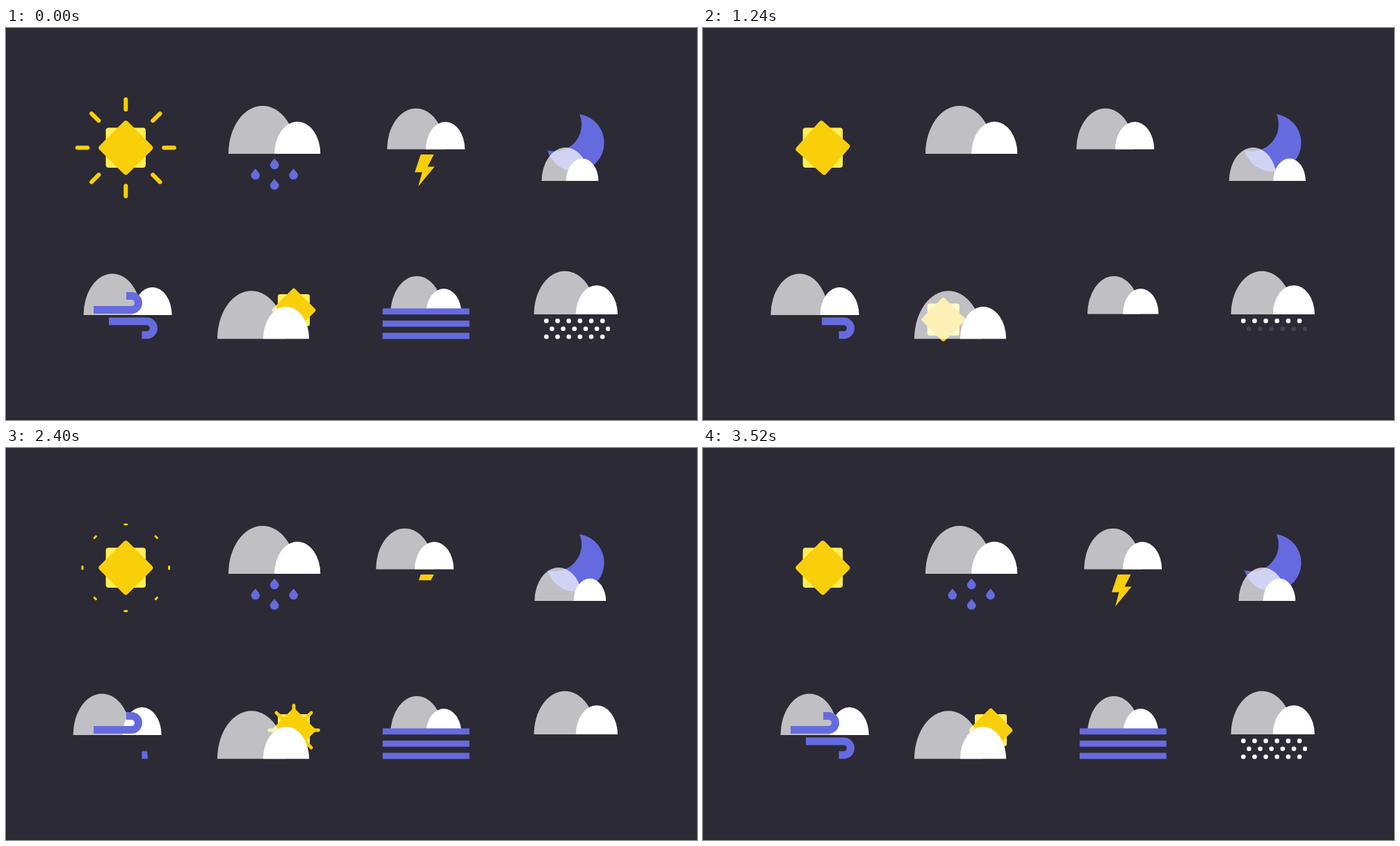
An HTML page for the animation above (3640 ms loop, 994 by 564 pixels).

```html
<!DOCTYPE html>
<html lang="en">
<head>
<meta charset="utf-8">
<title>Weather icons</title>
<style>
  html, body { margin: 0; width: 100%; height: 100%; overflow: hidden; background: #2c2a35; }
  svg { display: block; width: 994px; height: 564px; }
  .haze { fill: #fff; fill-opacity: .7; }
  .white { fill: #fff; }
  .gold { fill: #f9cf0a; }
  .lemon { fill: #ffee55; }
  .blue { fill: #656bdf; }
  .wind { fill: none; stroke: #656bdf; stroke-width: 11; }
</style>
</head>
<body>
<svg id="stage" viewBox="0 0 994 564">
  <defs>
    <clipPath id="boltClip"><rect id="wipe" x="580" y="182" width="45" height="46"/></clipPath>
    <clipPath id="snowClip"><rect x="760" y="414" width="108.7" height="40"/></clipPath>
  </defs>
  <rect y="561" width="994" height="3" fill="#2b2632"/>
</svg>
<script>
const LOOP = 3640, STEP = 40, LAST = 3520;
const stage = document.getElementById('stage');
const wipe = document.getElementById('wipe');

function add(tag, attrs, parent = stage) {
  const el = document.createElementNS('http://www.w3.org/2000/svg', tag);
  for (const k in attrs) el.setAttribute(k, attrs[k]);
  parent.appendChild(el);
  return el;
}
const group = (parent, attrs = {}) => add('g', attrs, parent);
const set = (el, k, v) => el.setAttribute(k, v);
const move = (el, x, y = 0) => set(el, 'transform', `translate(${x} ${y})`);
const turn = (el, deg) => set(el, 'transform', `rotate(${deg})`);

// Progress from 0 to 1: constant speed, and eased in and out.
const line = (t, start, span) => Math.min(1, Math.max(0, (t - start) / span));
const ease = (t, start, span) => {
  const p = line(t, start, span);
  return p * p * (3 - 2 * p);
};
// Goes from 1 to 0 at `out`, then back to 1 at `back`.
const blink = (t, out, back, span) => 1 - line(t, out, span) + line(t, back, span);

function dome(cls, cx, base, rx, ry, parent) {
  return add('path', { class: cls,
    d: `M${cx - rx} ${base}A${rx} ${ry} 0 0 1 ${cx + rx} ${base}Z` }, parent);
}
// Two overlapping domes; the small one keeps the same share of the large one.
function cloud(cx, base, rx, ry, gap) {
  const g = group(stage);
  return { g, back: dome('haze', cx, base, rx, ry, g),
    front: dome('white', cx + gap, base, rx * .675, ry * .672, g) };
}
function square(cls, half, parent) {
  return add('rect', { class: cls, x: -half, y: -half,
    width: 2 * half, height: 2 * half, rx: half * .14 }, parent);
}
function sun(half) {
  const g = group(stage), w = half * .21, len = half * .72;
  square('lemon', half, g);
  const rays = Array.from({ length: 8 }, (_, i) => add('rect', { class: 'gold',
    x: -w / 2, y: -len / 2, width: w, height: len, rx: w / 2 },
    group(g, { transform: `rotate(${i * 45})` })));
  return { g, rays, tile: square('gold', half, g) };
}

// Sunny
const day = sun(28.7);
move(day.g, 172.3, 172.3);

// Rain: drops on the corners of a diamond, hanging from their tips
cloud(369, 181, 49, 69, 50.2);
const drops = [-90, 180, 0, 90].map(deg => {
  const a = deg * Math.PI / 180;
  const x = 386.2 + 27.4 * Math.cos(a), y = 202.2 + 14.7 * Math.sin(a);
  return add('path', { class: 'blue',
    d: 'M0 0C2 3 6.4 6.5 6.4 9.4A6.4 6.4 0 1 1-6.4 9.4C-6.4 6.5-2 3 0 0Z' },
    group(stage, { transform: `translate(${x} ${y})` }));
});

// Thunder
const storm = cloud(589.8, 174.5, 41.6, 58.7, 42.2);
add('path', { class: 'gold', 'clip-path': 'url(#boltClip)',
  d: 'M596.5 182H615.5L606.5 199.5H616.5L593 228L598.5 207.5H588Z' });

// Night
add('path', { class: 'blue',
  d: 'M825 124A41.5 41.5 0 1 1 779 176A38.6 38.6 0 0 0 825 124Z' });
const night = cloud(805, 220, 34.5, 48, 24);

// Wind: each gust is traced from its curled tip
const breeze = cloud(153, 413, 41.5, 59.5, 57.6);
const gusts = ['M173 385.5H180.5A10 10 0 0 1 180.5 405.5H126',
  'M195.5 441.7H202.5A9.85 9.85 0 0 0 202.5 422H148'].map(d =>
  add('path', { class: 'wind', d, pathLength: 1 }));

// Partly cloudy
const peek = sun(23);
cloud(353, 447.3, 49, 69, 50);

// Fog
cloud(591, 411.5, 38, 54.5, 38.7);
const bars = [0, 1, 2].map(i => add('rect', { class: 'blue',
  x: 541.8, y: 403.4 + i * 17.6, height: 8.8 }));

// Snow
cloud(804, 412, 44.5, 62.3, 45.8);
const snow = group(stage, { 'clip-path': 'url(#snowClip)' });
const rows = [0, 1, 2].map(r => {
  const g = group(snow);
  for (let i = 0; i < 6; i++)
    add('circle', { class: 'white', cx: 777.3 + (i + r % 2 / 2) * 16.15,
      cy: 421.4 + r * 11.4, r: 3.3 }, g);
  return g;
});

function draw(t) {
  const ray = blink(t, 40, 1700, 460) - line(t, 2010, 460);
  day.rays.forEach(el => set(el, 'transform', `translate(0 -62.3) scale(1 ${Math.min(1, ray)})`));
  turn(day.tile, 45 + 360 * ease(t, 720, 1053) + 90 * ease(t, 3060, 460));

  drops.forEach((el, i) =>
    set(el, 'transform', `scale(${blink(t, 80 + i * 110, 1275 + i * 215, 145)})`));

  move(storm.g, 28 * (ease(t, 1380, 540) - ease(t, 1920, 480))
    - 16 * (ease(t, 1000, 380) - ease(t, 2400, 400)));
  set(wipe, 'height', 46 * blink(t, 120, 2358, 232));

  const part = ease(t, 0, 1625) - ease(t, 1625, LAST - 1625);
  move(night.back, -16 * part);
  move(night.front, 17 * part);

  move(breeze.g, -16 * (ease(t, 965, 350) - ease(t, 2345, 350)));
  gusts.forEach((el, i) => {
    const len = blink(t, 800 + i * 340, 1965 + i * 400, 400);
    set(el, 'stroke-dasharray', `${len} 2`);
    set(el, 'visibility', len > 0 ? 'visible' : 'hidden');
  });

  // Dips away to the left, then rises over the cloud and returns.
  move(peek.g,
    414 - 79 * (ease(t, 380, 1120) - ease(t, 1700, 660)),
    406 + 13.5 * ease(t, 380, 600) - 48.5 * ease(t, 1460, 460) + 35 * ease(t, 1920, 440));
  turn(peek.tile, 45 + 90 * ease(t, 1315, 1085));
  const reach = 8 + 22 * (ease(t, 2280, 130) - ease(t, 2480, 240));
  peek.rays.forEach(el => move(el, 0, -reach));

  bars.forEach((el, i) =>
    set(el, 'width', 124.8 * blink(t, 80 + i * 100, 1590 + i * 100, 150)));

  // Snow falls twice per loop.
  const beat = t < LAST ? t % (LAST / 2) : 0;
  rows.forEach((el, i) =>
    set(el, 'opacity', blink(beat, 180 + i * 120, 1090 + i * 135, 120)));
}

const start = performance.now();
function tick() {
  const t = (performance.now() - start) % LOOP;
  draw(Math.min(LAST, Math.floor(t / STEP) * STEP));
  requestAnimationFrame(tick);
}
draw(0);
requestAnimationFrame(tick);
</script>
</body>
</html>
```
